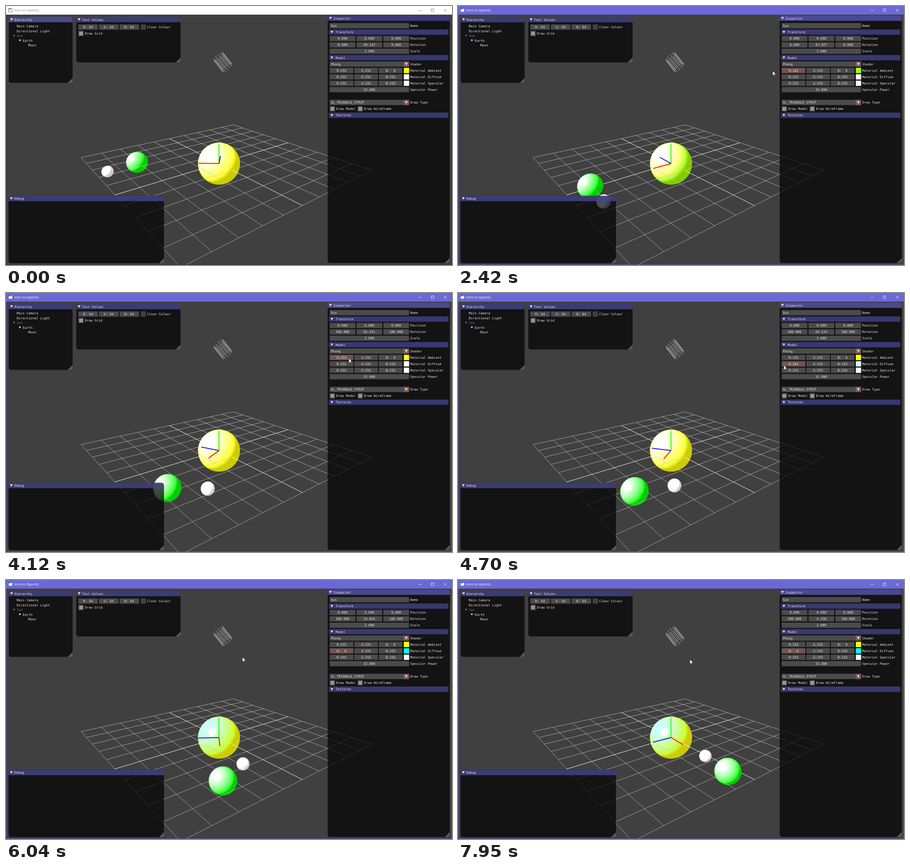
Write an HTML page with a canvas that moves like this. It is 981x571 px and loops after 8000 ms.

```html
<!DOCTYPE html>
<html lang="en">
<head>
<meta charset="utf-8">
<title>Intro to OpenGL</title>
<style>
  html, body { margin: 0; width: 981px; height: 571px; overflow: hidden; background: #404040; }
  canvas, svg { position: absolute; left: 0; top: 0; display: block; }
  text { font: 7.15px "DejaVu Sans Mono", monospace; fill: #e6e6e6; }
  .mid { text-anchor: middle; }
  .body { fill: #000; fill-opacity: .7; }
  .title { fill: #45458a; fill-opacity: .83; }
  .idle #hierarchy .title, .focused #inspector .title { fill: #5252a1; fill-opacity: .87; }
  .grip { fill: #fff; fill-opacity: .3; }
  .header { fill: #6666e6; fill-opacity: .45; }
  .field { fill: #ccc; fill-opacity: .3; }
  .field.hover { fill: #e6cccc; fill-opacity: .4; }
  .field.active { fill: #e6a6a6; fill-opacity: .45; }
  .drop { fill: #ab6666; fill-opacity: .6; }
  .check { fill: #e6e6e6; fill-opacity: .5; }
  .arrow { fill: #e6e6e6; }
  .dim { fill: #73739f; }
  .caption { font: 7.3px "Open Sans", sans-serif; }
  .bar { fill: #fff; }
  .frame, .buttons { fill: none; }
  .frame { stroke: #353535; }
  .buttons { stroke: #777; stroke-width: .8; }
  .idle .caption { fill: #8a8a8a; }
  .focused .bar { fill: #6b69d6; }
  .focused .frame { stroke: #5b59b8; }
  .focused .caption { fill: #fff; }
  .focused .buttons { stroke: #fff; }
</style>
</head>
<body>
<canvas id="scene" width="981" height="571"></canvas>
<svg id="ui" class="idle" width="981" height="571" viewBox="0 0 981 571"></svg>
<script>
const LOOP = 8000;
const clamp = (v, lo, hi) => Math.min(hi, Math.max(lo, v));
const dot = (a, b) => a[0] * b[0] + a[1] * b[1] + a[2] * b[2];

// Linear interpolation over [time, ...values] rows.
function track(rows, t) {
  const i = clamp(rows.findIndex(r => r[0] > t), 0, rows.length - 1) || (t < rows[0][0] ? 1 : rows.length - 1);
  const a = rows[i - 1], b = rows[i];
  const k = (t - a[0]) / (b[0] - a[0]);
  return a.slice(1).map((v, j) => v + (b[j + 1] - v) * k);
}

/* ---------- interface ---------- */

const ui = document.getElementById('ui');
const H = 11.65;
const rect = (x, y, w, h, cls, extra = '') => `<rect x="${x}" y="${y}" width="${w}" height="${h}" class="${cls}" ${extra}/>`;
const text = (x, y, s, cls = '', extra = '') => `<text x="${x}" y="${y + 2.6}" class="${cls}" ${extra}>${s}</text>`;
const arrow = (x, y, cls = 'arrow', s = 3) => `<path class="${cls}" d="M${x - s} ${y - s * .8}h${2 * s}l${-s} ${s * 1.7}z"/>`;
const field = (x, y, w, s, id = '') =>
  rect(x, y - H / 2, w, H, 'field', id && `id="${id}Box"`) + text(x + w / 2, y, s, 'mid', id && `id="${id}"`);
const swatch = (x, y, color, id = '') => rect(x, y - H / 2, 11.7, H, '', `fill="${color}" id="${id}"`);
const checkbox = (x, y, s) =>
  rect(x, y - H / 2, H, H, 'field') + rect(x + 1.8, y - H / 2 + 1.8, H - 3.6, H - 3.6, 'check') + text(x + 14.2, y, s);

function panel(id, x, y, w, h, name, content = '') {
  const r = 5.5, g = 10.8;
  return `<g id="${id}">${rect(x, y, w, h, 'body', `rx="${r}"`)}
    <path class="title" d="M${x} ${y + H}v${r - H}a${r} ${r} 0 0 1 ${r} ${-r}h${w - 2 * r}a${r} ${r} 0 0 1 ${r} ${r}v${H - r}z"/>
    <path class="grip" d="M${x + w} ${y + h - g}v${g - r}a${r} ${r} 0 0 1 ${-r} ${r}h${r - g}z"/>
    ${arrow(x + 6.3, y + 5.7)}${text(x + 12.6, y + 6, name)}${content}</g>`;
}

const row = i => 43.4 + 14.1 * i;
const header = (i, s) => rect(710.5, row(i) - H / 2, 262.5, H, 'header') + arrow(716.8, row(i)) + text(725, row(i), s);
const label = (i, s) => text(889, row(i), s);
const triple = (i, s, values, id) =>
  values.map((v, k) => field(712 + 59 * k, row(i), 56.5, v, id && id + k)).join('') + label(i, s);
const colour = (i, s, values, id) =>
  values.map((v, k) => field(712 + 54 * k, row(i), 52, 'RGB'[k] + ':' + v, id && k === 0 ? id : '')).join('') +
  swatch(875, row(i), '#fff', id + 'Swatch') + label(i, s);
const combo = (i, s, name) =>
  rect(712, row(i) - H / 2, 174.5, H, 'field') + rect(874.6, row(i) - H / 2, 11.9, H, 'drop') +
  arrow(880.5, row(i)) + text(714.5, row(i), s) + label(i, name);

const inspector =
  rect(712, row(0) - H / 2, 174.5, H, 'field') + text(714.5, row(0), 'Sun') + label(0, 'Name') +
  header(1, 'Transform') +
  triple(2, 'Position', ['0.000', '0.000', '0.000']) +
  triple(3, 'Rotation', ['0.000', '0.000', '0.000'], 'rot') +
  field(712, row(4), 174.5, '2.000') + label(4, 'Scale') +
  header(5, 'Model') +
  combo(6, 'Phong', 'Shader') +
  colour(7, 'Material Ambient', ['255', '255', '\u00a0\u00a00'], 'ambient') +
  colour(8, 'Material Diffuse', ['255', '255', '255'], 'diffuse') +
  colour(9, 'Material Specular', ['255', '255', '255'], 'specular') +
  field(712, row(10), 174.5, '32.000') + label(10, 'Specular Power') +
  combo(12, 'GL_TRIANGLE_STRIP', 'Draw Type') +
  checkbox(712, row(13), 'Draw Model') + checkbox(773.4, row(13), 'Draw WireFrame') +
  header(14, 'Textures');

const tree =
  text(23.5, 44.7, 'Main Camera') + text(23.5, 55.2, 'Directional Light') +
  arrow(17.8, 65.7, 'dim', 2.4) + text(24, 65.7, 'Sun', 'dim') +
  arrow(30.5, 76, 'arrow', 2.4) + text(36.7, 76, 'Earth') + text(49, 86.5, 'Moon');

const tests =
  [0, 1, 2].map(k => field(159 + 45.3 * k, 46.4, 43, 'RGB'[k] + ':\u00a064')).join('') +
  swatch(296.3, 46.4, '#404040') + text(310.5, 46.4, 'Clear Colour') + checkbox(159.2, 60.6, 'Draw Grid');

ui.innerHTML =
  '<rect class="frame" x=".5" y=".5" width="980" height="570"/>' +
  rect(0, 0, 981, 19, 'bar') +
  '<rect x="5.4" y="5.4" width="8.6" height="7.6" fill="#f4f4f4" stroke="#4b6b6b" stroke-width=".7"/>' +
  '<path d="M5.4 6.3h5.8" stroke="#2f7f86" stroke-width="1.8"/>' +
  text(18, 9.3, 'Intro to OpenGL', 'caption') +
  '<path class="buttons" d="M907.5 9.8h6.5M935.3 6.5h5.7v5.7h-5.7zM963.2 6.5l6 6m0-6l-6 6"/>' +
  panel('hierarchy', 6, 24, 140.5, 145.5, 'Hierarchy', tree) +
  panel('tests', 154.5, 24, 229.5, 100.5, 'Test Values', tests) +
  panel('inspector', 707.5, 21, 268.5, 545.5, 'Inspector', inspector) +
  panel('debug', 5.5, 418.5, 342, 148.5, 'Debug') +
  '<path id="cursor" d="M0 0V10.3L2.4 8.1L4 11.7L5.5 11L3.9 7.5H7.2Z" fill="#fff" stroke="#111" stroke-width=".6"/>';

const $ = id => document.getElementById(id);

/* ---------- scene ---------- */

const ctx = $('scene').getContext('2d');
const scratch = document.createElement('canvas');
const pen = scratch.getContext('2d');
const FOCAL = 665, EYE_X = 490.5, EYE_Y = 295;
const UP = [0, -.949, -.313];
const LIGHT = [-.552, -.533, -.64];
const UNIT = Math.SQRT2 / 10;
const WHITE = [255, 255, 255];

// Ground plane, measured along its two diagonals (corners at +-1).
function ground(p, q) {
  const w = 1 - .05125 * p - .458 * q;
  return { x: (468.6 + 295.1 * p - 260.5 * q) / w, y: (347.3 - 3.9 * p - 34.8 * q) / w, z: 14.58 * w };
}

const polar = (radius, deg) => {
  const a = deg * Math.PI / 180;
  return [-radius * UNIT * Math.cos(a), radius * UNIT * Math.sin(a)];
};

// Ray-traced Phong sphere; upperOnly keeps the part above the ground plane.
function drawSphere({ at, radius, ambient, diffuse }, upperOnly) {
  const { x, y, z } = at, scale = FOCAL / z;
  const half = Math.ceil(radius * scale * 1.12) + 2, size = 2 * half;
  const left = Math.round(x) - half, top = Math.round(y) - half;
  const c = [(x - EYE_X) / scale, (y - EYE_Y) / scale, z], cc = dot(c, c);
  scratch.width = scratch.height = size;
  const img = pen.createImageData(size, size);
  for (let j = 0; j < size; j++) for (let i = 0; i < size; i++) {
    let d = [(left + i + .5 - EYE_X) / FOCAL, (top + j + .5 - EYE_Y) / FOCAL, 1];
    const len = Math.sqrt(dot(d, d));
    d = d.map(v => v / len);
    const b = dot(d, c), disc = radius * radius - cc + b * b;
    const cover = clamp(disc / (2 * radius) * scale + .9, 0, 1);
    if (!cover) continue;
    const t = b - Math.sqrt(Math.max(0, disc));
    const n = d.map((v, k) => (v * t - c[k]) / radius);
    if (upperOnly && dot(n, UP) < 0) continue;
    const lit = Math.max(0, dot(n, LIGHT));
    const mirror = n.map((v, k) => 2 * lit * v - LIGHT[k]);
    const shine = lit ? Math.max(0, -dot(mirror, d)) ** 32 : 0;
    const o = 4 * (j * size + i);
    for (let k = 0; k < 3; k++) img.data[o + k] = ambient[k] * .8 + diffuse[k] * lit + 255 * shine;
    img.data[o + 3] = 255 * cover;
  }
  pen.putImageData(img, 0, 0);
  ctx.drawImage(scratch, left, top);
}

function line(a, b, color, width) {
  ctx.strokeStyle = color;
  ctx.lineWidth = width;
  ctx.beginPath();
  ctx.moveTo(a.x, a.y);
  ctx.lineTo(b.x, b.y);
  ctx.stroke();
}

function drawGrid() {
  const at = (u, v) => ground((u + v) / 10, (v - u) / 10);
  for (let i = -5; i <= 5; i++) {
    const style = i ? ['#c4c4c4', .75] : ['#fff', .95];
    line(at(i, -5), at(i, 5), ...style);
    line(at(-5, i), at(5, i), ...style);
  }
}

function drawLightIcon() {
  for (let k = 0; k < 12; k++) {
    const a = (k + .3) * Math.PI / 6, c = Math.cos(a), s = Math.sin(a);
    const x = 466.8 + 10 * c + 2.5 * s, y = 111 - 8.5 * c + 3 * s;
    line({ x, y }, { x: x + 20.5, y: y + 26 }, '#e4e4e4', .8);
  }
}

function drawScene(angle, ambientR, diffuseR) {
  const orbit = angle - 45;
  const earth = polar(4, orbit), moon = polar(1.5, 2 * orbit + 45);
  const sun = ground(0, 0);
  const spheres = [
    { at: sun, radius: 1, ambient: [ambientR, 255, 0], diffuse: [diffuseR, 255, 255] },
    { at: ground(...earth), radius: .5, ambient: [0, 255, 0], diffuse: WHITE },
    { at: ground(earth[0] + moon[0], earth[1] + moon[1]), radius: .25, ambient: WHITE, diffuse: WHITE }
  ].sort((a, b) => b.at.z - a.at.z);

  ctx.fillStyle = '#404040';
  ctx.fillRect(0, 0, 981, 571);
  drawLightIcon();
  spheres.forEach(s => drawSphere(s, false));
  drawGrid();
  spheres.forEach(s => drawSphere(s, true));
  line(sun, ground(...polar(1, orbit)), '#f00', 1.8);
  line(sun, { x: 468.4, y: 304.4 }, '#0f0', 1.8);
  line(sun, ground(...polar(1, orbit - 90)), '#00f', 1.8);
}

/* ---------- timeline ---------- */

const SPIN = [[0, 49.131], [1380, 71.402], [3380, 102.959], [4120, 114.633], [5300, 133.405], [6040, 145.16], [7950, 175.646], [8000, 176.44]];
const POINTER = [
  [600, 886, 507], [900, 800, 260], [1200, 742, 139], [1400, 742, 139], [1620, 749, 140],
  [3380, 624, 146.5], [4060, 754, 144], [4160, 754, 144], [4420, 748.1, 157], [4500, 748.1, 157],
  [5300, 622.5, 165.5], [5960, 520, 170], [6040, 520, 170], [6800, 511, 172], [7300, 540, 174], [7880, 510, 175], [8000, 510, 175]
];
const CLICK = 1300, RELEASE = 4190, GRAB = 4480, DRAG = 1.632;

function update(t) {
  const [angle] = track(SPIN, t);
  const [x, y] = track(POINTER, Math.max(t, 600));
  const byte = v => Math.round(clamp(v, 0, 255));
  const ambientR = t < 1620 || t > RELEASE ? 255 : byte(255 - DRAG * (749 - x));
  const diffuseR = t < GRAB ? 255 : byte(t < 6800 ? 255 - DRAG * (748.1 - x) : DRAG * (x - 511));

  drawScene(angle, ambientR, diffuseR);

  ui.setAttribute('class', t < CLICK ? 'idle' : 'focused');
  const flipped = angle > 90;
  $('rot0').textContent = $('rot2').textContent = flipped ? '180.000' : '0.000';
  $('rot1').textContent = (flipped ? 180 - angle : angle).toFixed(3);
  const show = (id, r, rest, state) => {
    $(id).textContent = 'R:' + String(r).padStart(3, '\u00a0');
    $(id + 'Swatch').setAttribute('fill', `rgb(${r},${rest})`);
    $(id + 'Box').setAttribute('class', 'field ' + state);
  };
  show('ambient', ambientR, '255,0', t >= CLICK && t < RELEASE ? 'active' : t >= 1200 && t < 4260 ? 'hover' : '');
  show('diffuse', diffuseR, '255,255', t >= GRAB ? 'active' : t >= 4340 ? 'hover' : '');
  $('cursor').setAttribute('transform', `translate(${x} ${y})`);
  $('cursor').setAttribute('visibility', t < 600 ? 'hidden' : 'visible');
}

const start = performance.now();
function tick() {
  update((performance.now() - start) % LOOP);
  requestAnimationFrame(tick);
}
tick();
</script>
</body>
</html>
```
